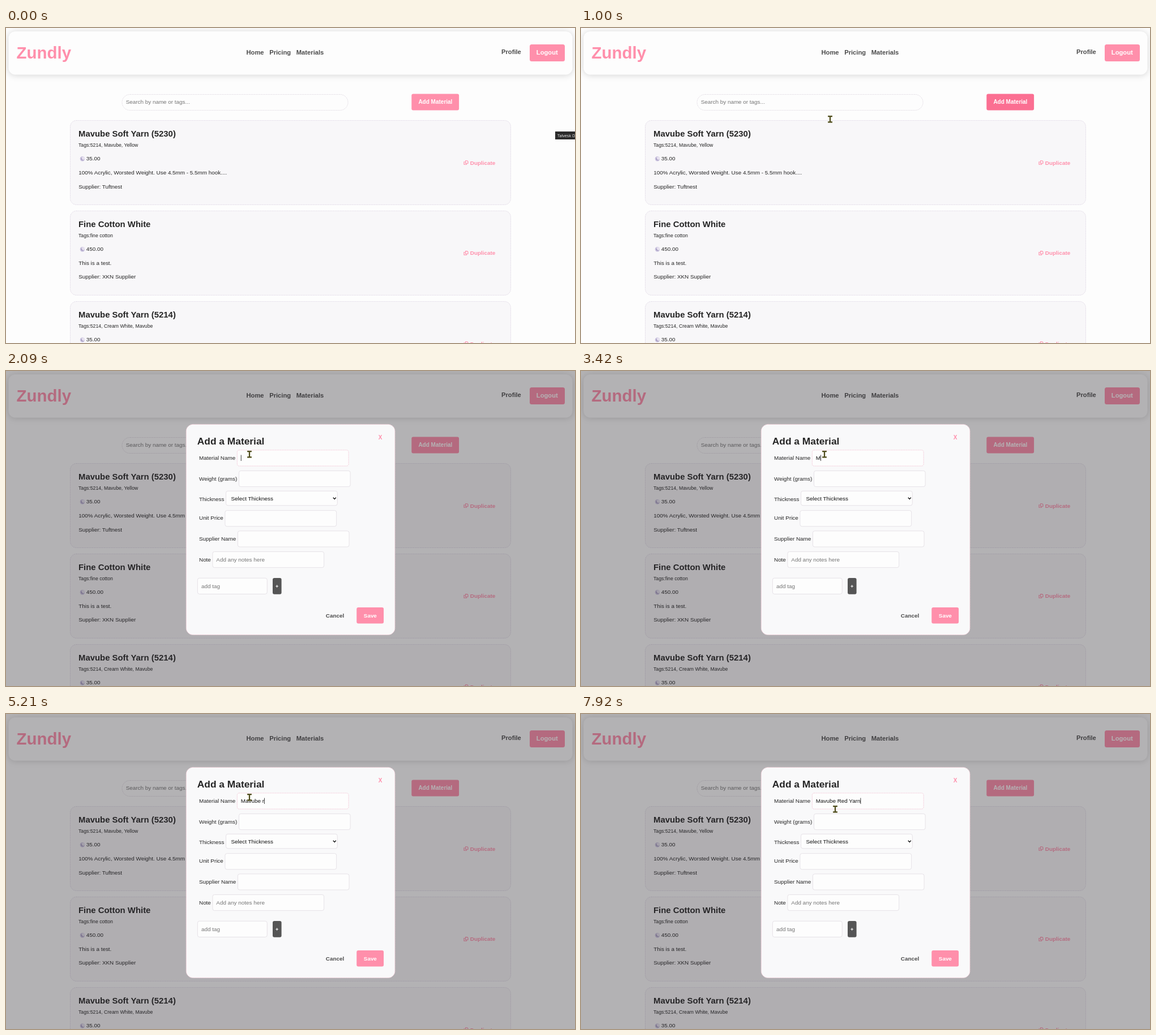
Write an HTML page that moves like this. It is 1005x557 px and loops after 8 s.

```html
<!DOCTYPE html>
<html lang="en">
<head>
<meta charset="utf-8">
<title>Add a material</title>
<style>
  html, body { margin: 0; width: 100%; height: 100%; overflow: hidden; background: #fdfdfd; }
  svg { display: block; width: 100vw; height: 100vh; }
  text { font-family: "Liberation Sans", Arial, sans-serif; white-space: pre; }
  .bar { filter: drop-shadow(0 1px 6px rgba(0, 0, 0, .16)); }
</style>
</head>
<body>
<svg id="stage" viewBox="0 0 1005 557"></svg>
<script>
const NS = "http://www.w3.org/2000/svg";
const stage = document.getElementById("stage");
const LOOP = 8000;
const PINK = "#ff8fab", PINK_DARK = [251, 111, 146], PINK_LIGHT = [255, 143, 171];
const INK = "#252525", GREY = "#4b4b4b", HINT = "#757575", BODY = 9.9;

function add(parent, tag, attrs) {
  const el = document.createElementNS(NS, tag);
  for (const key in attrs) el.setAttribute(key, attrs[key]);
  parent.appendChild(el);
  return el;
}
const group = (parent, attrs = {}) => add(parent, "g", attrs);
const path = (parent, d, attrs) => add(parent, "path", { d, ...attrs });

function box(parent, x, y, width, height, rx, fill, stroke, dash) {
  const attrs = { x, y, width, height, rx, fill };
  if (stroke) attrs.stroke = stroke;
  if (dash) attrs["stroke-dasharray"] = dash;
  return add(parent, "rect", attrs);
}

function label(parent, x, y, size, text, fill = INK, bold = false) {
  const el = add(parent, "text", { x, y, "font-size": size, fill });
  if (bold) el.setAttribute("font-weight", 700);
  el.textContent = text;
  return el;
}

function show(el, on) {
  el.setAttribute("visibility", on ? "visible" : "hidden");
}

// Page header
const page = group(stage);
box(page, 0, 0, 1005, 557, 0, "#fdfdfd");
box(page, 4.5, 6, 996, 76.5, 12, "#fdfdfd").setAttribute("class", "bar");
label(page, 18.5, 53.5, 29.5, "Zundly", PINK, true);
label(page, 424.5, 47.4, 11.2, "Home", GREY, true);
label(page, 465.2, 47.4, 11.2, "Pricing", GREY, true);
label(page, 512.8, 47.4, 11.2, "Materials", GREY, true);
label(page, 875, 45.6, 11.2, "Profile", GREY, true);
box(page, 925, 29, 62, 30, 3.5, PINK);
label(page, 936.8, 47.4, 11.2, "Logout", "#fff", true);

// Search row
box(page, 205, 117.5, 399, 28, 14, "#fdfdfd", "#e4dfe6", "2 1");
label(page, 211.7, 134.4, BODY, "Search by name or tags...", HINT);
const addButton = box(page, 716.3, 116.5, 83.8, 29, 3, PINK);
label(page, 728.4, 134.4, 10, "Add Material", "#fff", true);

// Material cards
function card(y, title, tags, price, note, supplier) {
  const g = group(page, { transform: `translate(0 ${y})` });
  box(g, 113.5, 0, 778, 149, 11, "#f8f7f9", "#e3dce8", "2 1");
  label(g, 128, 28.5, 14.9, title, INK, true);
  label(g, 128, 46.7, 8.7, "Tags:" + tags);
  add(g, "circle", { cx: 135, cy: 67.8, r: 4.2, fill: "#c5bddb" });
  add(g, "circle", { cx: 136.2, cy: 66.8, r: 2.9, fill: "#e6e1ef" });
  path(g, "M134.5 65.5a2.4 2.4 0 1 0 3 3.3a2.2 2.2 0 0 1-3-3.3z", { fill: "#8d82ad" });
  label(g, 141.7, 70.7, BODY, price);
  label(g, 128.2, 95.3, BODY, note);
  label(g, 128.2, 120, BODY, "Supplier: " + supplier);
  const line = { fill: "none", stroke: PINK, "stroke-width": 1.1 };
  path(g, "M811.6 71.2h3l1.4 1.4v3.2h-4.4z", line);
  path(g, "M810.4 73.2h-1.4v4.6h4.6v-1.2", line);
  label(g, 819.8, 78.1, BODY, "Duplicate", PINK, true);
}
card(163.5, "Mavube Soft Yarn (5230)", "5214, Mavube, Yellow", "35.00",
  "100% Acrylic, Worsted Weight. Use 4.5mm - 5.5mm hook....", "Tuftnest");
card(323.4, "Fine Cotton White", "fine cotton", "450.00", "This is a test.", "XKN Supplier");
card(483.6, "Mavube Soft Yarn (5214)", "5214, Cream White, Mavube", "35.00", "", "Tuftnest");

// Hover tip at the right edge
const tip = group(stage);
box(tip, 970, 183, 40, 14, 0, "#2b2b2b");
label(tip, 974, 192.8, 7.2, "Talvesk D", "#f2f2f2")
  .setAttribute("style", 'font-family:"Open Sans",sans-serif');

// Dialog
const dialog = group(stage);
box(dialog, 0, 0, 1005, 557, 0, "rgba(40,37,43,.35)");
box(dialog, 318.3, 94.4, 368.6, 372, 12, "#f9f9fa", "#fbd3de", "2 1");
label(dialog, 337.8, 130, 17.35, "Add a Material", INK, true);
label(dialog, 657.8, 121, 10, "X", PINK, true);

function field(name, labelY, x, y, width, height = 28.2) {
  label(dialog, 341, labelY, BODY, name);
  return box(dialog, x, y, width, height, 3.5, "#fdfdfd", "#e6e2e7");
}
const nameField = field("Material Name", 156.6, 408.3, 139.8, 196.8);
field("Weight (grams)", 193.6, 411.4, 176.4, 196.8);
field("Thickness", 229.8, 388.5, 212.2, 196.8, 25.6);
field("Unit Price", 263.2, 386.9, 246.6, 196.8);
field("Supplier Name", 300.2, 409.3, 282.8, 196.8);
field("Note", 336.6, 364.9, 319.4, 196.8);
box(dialog, 338.3, 366.2, 123, 28.2, 3.5, "#fdfdfd", "#e6e2e7");

label(dialog, 397.5, 228.8, BODY, "Select Thickness", "#111");
path(dialog, "M577.8 223.8l2.5 2.6l2.5-2.6", { fill: "none", stroke: "#111", "stroke-width": 1.4 });
label(dialog, 371.3, 336.6, BODY, "Add any notes here", HINT);
label(dialog, 345, 383.6, BODY, "add tag", HINT);
box(dialog, 471, 366, 15.6, 28.8, 3, "#555");
label(dialog, 476, 383.5, 9, "+", "#fff", true);
label(dialog, 564.8, 435.8, BODY, "Cancel", GREY, true);
box(dialog, 619.3, 418, 47.8, 28.6, 3, PINK);
label(dialog, 631.8, 435.8, BODY, "Save", "#fff", true);
const typed = label(dialog, 414.8, 157.2, BODY, "", "#111");
const caret = box(dialog, 0, 148.5, 0.8, 10.5, 0, "#111");

// Pointers, each drawn around its hot spot
const pointer = group(stage);
const outline = { fill: "#1c1c1c", stroke: "#fff", "stroke-width": 0.7 };
const arrow = path(pointer, "M0 0v11.5l2.7-2.5l1.8 4l1.8-.8l-1.8-3.9h3.7z", outline);
const hand = path(pointer,
  "M-1 0q1-1 2 0v4.5l4.5 1.2q1.3.5 1 2l-.8 4.3h-6l-3.6-4.5q0-1.4 1.5-.9l1.4 1z",
  { fill: "#fff", stroke: "#222", "stroke-width": 0.8 });
const beam = group(pointer);
const beamShape = "M-3.9-4.8h2.8l1.1.7l1.1-.7h2.8M-3.9 5.4h2.8l1.1-.7l1.1.7h2.8M0-4.5v9.5";
path(beam, beamShape, { fill: "none", stroke: "#eeeebc", "stroke-width": 3, opacity: 0.4 });
path(beam, beamShape, { fill: "none", stroke: "#4c4a1c", "stroke-width": 2.2 });

// Timeline
const OPEN = 1090, FOCUS = 1900;
const route = [
  [80, 1004, 188], [280, 910, 165], [540, 758, 132], [720, 758, 132], [960, 440, 161],
  [1460, 440, 161], [1800, 430, 147], [7840, 430, 147], [7880, 438, 155], [7920, 449, 168]
];
// "<" deletes the last letter
const strokes = "Mavube r<Red YT<arn";
const keyTimes = [3300, 3540, 3700, 3860, 4040, 4220, 4420, 5080, 5330,
  5600, 5780, 5960, 6260, 6460, 6700, 7100, 7340, 7560, 7780];

const clamp = v => Math.max(0, Math.min(1, v));

function pointerAt(t) {
  const next = route.findIndex(stop => stop[0] > t);
  if (next < 0) return route[route.length - 1].slice(1);
  if (next === 0) return route[0].slice(1);
  const [t0, x0, y0] = route[next - 1], [t1, x1, y1] = route[next];
  const p = (t - t0) / (t1 - t0), e = p * p * (3 - 2 * p);
  return [x0 + (x1 - x0) * e, y0 + (y1 - y0) * e];
}

function textAt(t) {
  let text = "", last = FOCUS;
  keyTimes.forEach((time, i) => {
    if (time > t) return;
    last = time;
    text = strokes[i] === "<" ? text.slice(0, -1) : text + strokes[i];
  });
  return [text, last];
}

function draw(t) {
  const [x, y] = pointerAt(t);
  const overButton = t < 950 && x > 716 && x < 800 && y < 146;
  pointer.setAttribute("transform", `translate(${x} ${y})`);
  show(arrow, t >= 80 && t < 950 && !overButton);
  show(hand, overButton);
  show(beam, t >= 950);
  show(tip, t < 280);

  const hover = t < OPEN ? clamp((t - 480) / 200) : 0;
  const tone = PINK_LIGHT.map((c, i) => Math.round(c + (PINK_DARK[i] - c) * hover));
  addButton.setAttribute("fill", `rgb(${tone})`);

  const open = t >= OPEN, focused = t >= FOCUS;
  dialog.setAttribute("display", open ? "inline" : "none");
  nameField.setAttribute("stroke", focused ? "#f3cbd9" : "#e6e2e7");
  nameField.setAttribute("stroke-dasharray", focused ? "2 1" : "none");
  const [text, last] = textAt(t);
  typed.textContent = text;
  caret.setAttribute("x", 414.8 + (open && text ? typed.getComputedTextLength() : 0));
  show(caret, focused && (t - last) % 1060 < 530);
}

const start = performance.now();
function tick() {
  draw((performance.now() - start) % LOOP);
  requestAnimationFrame(tick);
}
tick();
</script>
</body>
</html>
```
